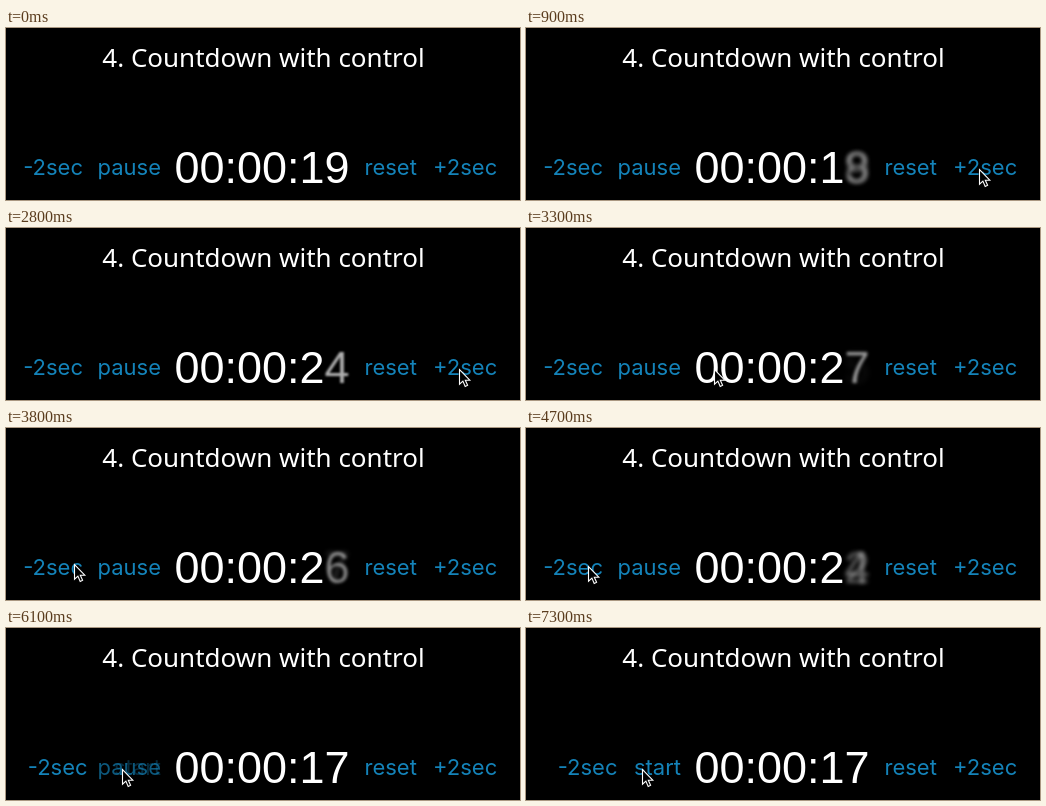
Write an HTML page that moves like this. It is 514 by 172 pixels and loops after 7.7 s.

```html
<!DOCTYPE html>
<html lang="en">
<head>
<meta charset="utf-8">
<title>Countdown with control</title>
<style>
  html, body { margin: 0; width: 100%; height: 100%; overflow: hidden; background: #000; }
  svg { display: block; width: 100vw; height: 100vh; }
  .title { font: 26px "Noto Sans", sans-serif; fill: #fff; text-anchor: middle; }
  .clock { font: 45px "Liberation Sans", Arial, sans-serif; fill: #fff; }
  .button { font: 22px Inter, sans-serif; fill: #1483b9; }
  .end { text-anchor: end; }
</style>
</head>
<body>
<svg viewBox="0 0 514 172">
  <text class="title" x="257.5" y="39">4. Countdown with control</text>
  <g class="button">
    <text id="minus" class="end" x="77" y="147">-2sec</text>
    <text id="pause" class="end" x="155" y="147">pause</text>
    <text id="start" class="end" x="155" y="147">start</text>
    <text x="358.5" y="147">reset</text>
    <text x="427" y="147">+2sec</text>
  </g>
  <g class="clock" id="clock">
    <text x="168.5" y="155">00:00:</text>
  </g>
  <path id="cursor" d="M.5 .5V15.2L3.9 12.1 6.2 17.4 8.6 16.3 6.3 11.2H10.8Z" stroke="#fff" stroke-width="1.1"/>
</svg>
<script>
const LOOP = 7700, STEP = 100, FADE = 500;

// [time, seconds shown]
const counts = [
  [-300, 19], [780, 18], [1750, 20], [2200, 22], [2580, 24], [2920, 25],
  [3120, 27], [3650, 26], [4250, 24], [4600, 22], [4800, 21], [5150, 19], [5200, 17]
];

// [time, x, y]
const path = [
  [0, 404, 180], [800, 453, 141], [3080, 453, 141], [3300, 188, 141],
  [3500, 60, 138], [3700, 68, 136], [4150, 68, 136], [4300, 62, 138],
  [4950, 62, 138], [5350, 106, 141], [5600, 116, 141]
];

const $ = id => document.getElementById(id);
const clamp = v => Math.max(0, Math.min(1, v));
const smooth = v => v * v * (3 - 2 * v);
const easeOut = v => 1 - (1 - v) ** 2;

function makeDigit(x) {
  const el = document.createElementNS("http://www.w3.org/2000/svg", "text");
  el.setAttribute("x", x);
  el.setAttribute("y", 155);
  $("clock").append(el);
  return el;
}

// Each place has an outgoing and an incoming glyph
const places = [
  { x: 293.6, digit: n => Math.floor(n / 10) },
  { x: 318.6, digit: n => n % 10 }
].map(p => ({ ...p, old: makeDigit(p.x), now: makeDigit(p.x) }));

function show(el, text, amount) {
  const blur = 3.5 * (1 - amount);
  el.textContent = text;
  el.style.opacity = amount;
  el.style.filter = blur > 0.05 ? `blur(${blur}px)` : "none";
}

function drawPlace({ digit, old, now }, t) {
  let last = digit(counts[0][1]), before = last, changed = -FADE;
  for (const [time, n] of counts) {
    if (time > t) break;
    if (digit(n) !== last) {
      before = last;
      last = digit(n);
      changed = time;
    }
  }
  const k = easeOut(clamp((t - changed) / FADE));
  show(old, before, clamp(1 - 1.6 * k));
  show(now, last, k);
}

function cursorAt(t) {
  const i = path.findIndex(p => p[0] > t);
  if (i < 0) return path[path.length - 1].slice(1);
  const [t0, x0, y0] = path[i - 1], [t1, x1, y1] = path[i];
  const k = smooth((t - t0) / (t1 - t0));
  return [x0 + (x1 - x0) * k, y0 + (y1 - y0) * k];
}

function draw(t) {
  places.forEach(p => drawPlace(p, t));
  const k = smooth(clamp((t - 5930) / 450));
  $("pause").style.opacity = 1 - k;
  $("start").style.opacity = k;
  $("minus").setAttribute("x", 77 + 14.5 * k);
  $("cursor").setAttribute("transform", `translate(${cursorAt(t)})`);
}

const begin = performance.now();
function tick() {
  const t = (performance.now() - begin) % LOOP;
  draw(Math.floor(t / STEP) * STEP);
  requestAnimationFrame(tick);
}
tick();
</script>
</body>
</html>
```
